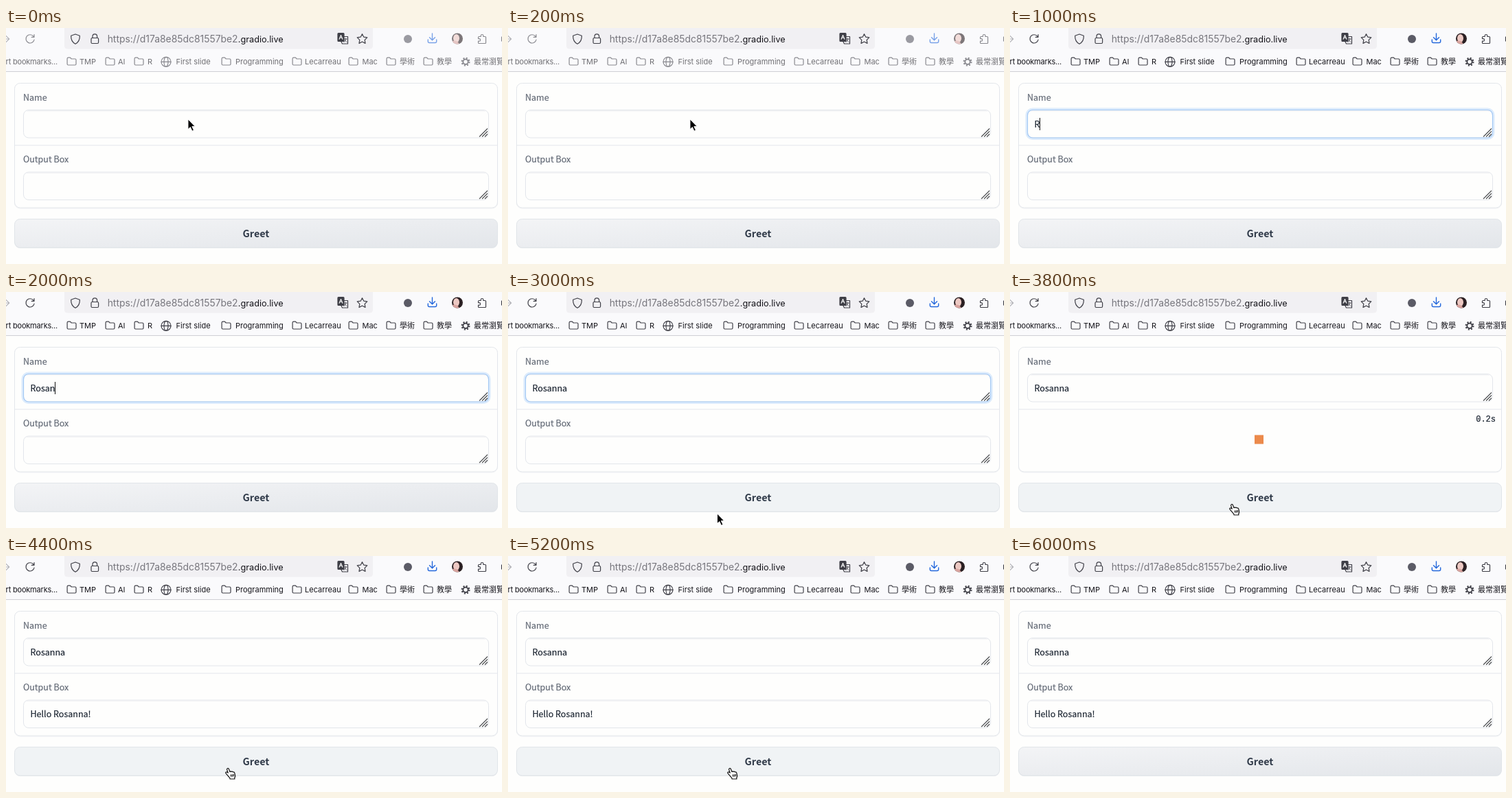
Write an HTML page that moves like this. It is 722 px wide and 344 px high and loops after 6.2 s.

```html
<!DOCTYPE html>
<html lang="en">
<head>
<meta charset="utf-8">
<title>Greeting form</title>
<style>
  html, body { margin: 0; width: 100%; height: 100%; overflow: hidden; background: #fefefd; }
  svg { display: block; width: 100%; height: 100%; }
  text { white-space: pre; }
  .ui { font: 11px Inter, "Noto Sans CJK TC", "Noto Sans CJK SC", "Noto Sans CJK JP", sans-serif; fill: #15141a; }
  .ui .path { font-size: 13.9px; fill: #77767d; }
  .ui .host { font-size: 12.7px; }
  .page { font: 12.5px "Noto Sans CJK TC", "Noto Sans CJK SC", "Noto Sans CJK JP", "Noto Sans CJK", "Open Sans", sans-serif; }
  .page text { fill: #1b2431; stroke: #1b2431; stroke-width: .2; }
  .page .label { fill: #626975; stroke: #626975; }
  .page .go { font-size: 14.3px; font-weight: 600; fill: #313b4a; stroke: none; }
  .page .mono { font: 12px "Liberation Mono", monospace; }
  .icon { fill: none; stroke: #3f3f47; stroke-width: 1.2; stroke-linecap: round; stroke-linejoin: round; }
  .idle .fade { opacity: .6; }
</style>
</head>
<body>
<svg viewBox="0 0 722 344" xmlns="http://www.w3.org/2000/svg">
  <defs>
    <linearGradient id="rest" x1="0" y1="0" x2="1" y2="1">
      <stop offset="0" stop-color="#f3f4f6"/><stop offset="1" stop-color="#e3e6ea"/>
    </linearGradient>
    <clipPath id="face"><circle cx="657" cy="15.5" r="8"/></clipPath>
    <path id="folder" d="M.6 2.3Q.6.7 2.2.7H5L6.7 2.5H12Q13.5 2.5 13.5 4V10Q13.5 11.5 12 11.5H2.2Q.6 11.5.6 10Z"/>
    <path id="grip" d="M0 12L12 0M4 12L12 4M8 12L12 8" stroke="#4b4d50" stroke-width="1.1"/>
    <g id="field">
      <rect x="25.5" y=".5" width="677" height="40.5" rx="7.5" fill="#fefefd" stroke="#e3e6eb"/>
      <path d="M30 1.8H698" stroke="#f1f2f4" stroke-width="1.6"/>
    </g>
  </defs>

  <g id="chrome" class="idle">
    <rect width="722" height="63.5" fill="#fafafc"/>
    <path d="M0 63.5H722" stroke="#cfcfd4"/>
    <path d="M85 0H534V26Q534 30.5 529 30.5H90Q85 30.5 85 26Z" fill="#f1f0f3"/>

    <g class="icon">
      <path d="M-3 16H4.5M0 11.5L4.7 16L0 20.5" stroke="#b5b5ba"/>
      <g class="fade">
        <path d="M40 12.2A6.1 6.1 0 1 0 41.1 17M41 9.5V13.3H37.2"/>
        <path d="M688.5 12.5H691.2V11.3A1.8 1.8 0 0 1 694.8 11.3V12.5H697.5Q698.5 12.5 698.5 13.5V21.5Q698.5 22.5 697.5 22.5H688.5Q687.5 22.5 687.5 21.5V19.2H688.8A1.8 1.8 0 0 0 688.8 15.6H687.5V13.5Q687.5 12.5 688.5 12.5Z"/>
        <path d="M721.5 13V19"/>
      </g>
      <path d="M101 9L107.3 11.2Q107.8 19.5 101 23.2Q94.2 19.5 94.7 11.2Z"/>
      <rect x="124" y="14.5" width="10.6" height="8" rx="1.5"/>
      <path d="M126 14.5V12.2A3.3 3.3 0 0 1 132.6 12.2V14.5"/>
      <path d="M518.5 8.7L520.8 13.2L525.8 13.9L522.2 17.4L523 22.4L518.5 20L514 22.4L514.8 17.4L511.2 13.9L516.2 13.2Z"/>
      <path d="M491 12.5H497.5V23H489.5L488 20"/>
      <path d="M492 16H496.2M494.1 15V16M495.3 16Q494.5 19 491.8 20.5M493 17.5L496 20.5" stroke-width=".8"/>
      <rect x="483" y="7.5" width="9" height="12" rx="1" fill="#3f3f47"/>
      <path d="M485.1 16.3L487.5 10.5L489.9 16.3M486 14.3H489" stroke="#fff" stroke-width="1.1"/>
    </g>

    <g class="fade">
      <circle cx="585" cy="16" r="6" fill="#5b5b66"/>
      <path class="icon" style="stroke:#2468dc;stroke-width:1.4" d="M620.5 8V17.5M616.5 13.8L620.5 17.7L624.5 13.8M614.3 17V19.5Q614.3 21.5 616.3 21.5H624.7Q626.7 21.5 626.7 19.5V17"/>
      <g clip-path="url(#face)">
        <rect x="649" y="7" width="16" height="17" fill="#2b2023"/>
        <ellipse cx="655.5" cy="15" rx="4.5" ry="6" fill="#edc9c3"/>
        <path d="M649 24V19Q657 17 660 24Z" fill="#d9a49f"/>
      </g>
    </g>

    <g class="ui">
      <text class="path" x="337.6" y="20.5" text-anchor="end">https://d17a8e85dc81557be2</text>
      <text class="host" x="337.8" y="20.5">.gradio.live</text>
    </g>
    <g id="marks" class="ui fade">
      <text x="75" y="53.4" text-anchor="end" letter-spacing="-.2">Import bookmarks...</text>
      <g class="icon" transform="translate(233 49.3)">
        <circle r="7"/><ellipse rx="3" ry="7"/><path d="M-7 0H7"/>
      </g>
      <g class="icon" transform="translate(669 49.3)">
        <circle r="3.7" stroke-width="1.9"/>
        <circle r="5.4" stroke-width="2.2" stroke-linecap="butt" stroke-dasharray="2 2.241"/>
      </g>
    </g>
  </g>

  <g class="page">
    <rect x="12.5" y="81.5" width="703" height="181.5" rx="8" fill="none" stroke="#f0f1f3"/>
    <rect x="12.5" y="80.5" width="703" height="181.5" rx="8" fill="#fefefd" stroke="#e3e6eb"/>
    <path d="M13 171H715" stroke="#e3e6eb"/>
    <text class="label" x="25" y="105.8">Name</text>
    <use href="#field" y="119"/>
    <g id="ring" fill="none">
      <rect x="24" y="118" width="680" height="43.5" rx="9" stroke="#dcebfc" stroke-width="3"/>
      <rect x="25.5" y="119.5" width="677" height="40.5" rx="7.5" stroke="#a3c8f4" stroke-width="1.2"/>
    </g>
    <use href="#grip" x="689" y="146.5"/>
    <text id="name" x="35.5" y="144.6"></text>
    <path id="caret" d="M0 131V149" stroke="#111"/>

    <g id="output">
      <text class="label" x="25" y="196.3">Output Box</text>
      <use href="#field" y="209.5"/>
      <use href="#grip" x="689" y="237"/>
      <text id="reply" x="35.5" y="235"></text>
    </g>
    <g id="pending">
      <text id="timer" class="mono" x="707" y="188.5" text-anchor="end"></text>
      <rect x="356" y="208.5" width="13" height="13" fill="#ec8a4b"/>
    </g>

    <rect x="12.5" y="280" width="703" height="41" rx="8" fill="#e6e9ec"/>
    <rect id="button" x="12.5" y="278.5" width="703" height="41.5" rx="8" stroke="#e1e5e9"/>
    <text class="go" x="364" y="305.2" text-anchor="middle">Greet</text>
  </g>

  <g id="pointer">
    <path id="arrow" d="M0 0V14.6L3.4 11.5L6 17.2L8.4 16.1L5.8 10.6H10.2Z" fill="#000" stroke="#fff" stroke-width=".9"/>
    <path id="beam" d="M-2.5 -8Q0 -8 0 -6Q0 -8 2.5 -8M0 -6V6M-2.5 8Q0 8 0 6Q0 8 2.5 8M-1.5 3H1.5" fill="none" stroke="#222"/>
    <path id="hand" d="M3.6 11.2L1 8.2Q-.2 6.6 1 6Q2.2 5.4 3.9 7L2.4 2.6Q2 .9 3.3.5Q4.6.2 5.2 1.8L6.6 5.6Q7.6 4.3 8.9 5.5Q10.2 4.6 11.2 5.9Q13 5.4 13.5 7.4L14.2 10.5Q14.6 12.8 13.4 14.6L13.6 16H6.8L6.5 14.6Q5 13 3.6 11.2ZM8 9.5L8.4 12.8M10 9.3L10.4 12.6M12 9L12.3 12.3" fill="#fff" stroke="#111" stroke-width="1.2" stroke-linejoin="round"/>
  </g>
</svg>
<script>
const LOOP = 6200, STEP = 200;
const NAME = "Rosanna";
const $ = id => document.getElementById(id);
const show = (id, on) => { $(id).style.display = on ? "" : "none"; };
const within = (t, a, b) => t >= a && t < b;

// Each row holds from its time until the next row.
const typed = [[0, 0], [1000, 1], [1200, 2], [1400, 4], [2000, 5], [2200, 6], [2400, 7]];
const moves = [
  [0, "arrow", 265, 133], [400, "beam", 266, 140], [1000, ""],
  [2600, "beam", 268, 146], [2800, "beam", 288, 238],
  [3000, "arrow", 304.5, 323], [3200, "arrow", 314, 322],
  [3400, "hand", 319.3, 309], [5600, ""]
];
const rowAt = (rows, t) => rows.filter(r => r[0] <= t).pop();

const bookmarks = [
  [89, 107, "TMP"], [145, 163, "AI"], [187, 206, "R"], [0, 247.5, "First slide"],
  [314, 334, "Programming"], [417, 435, "Lecarreau"], [499, 518.5, "Mac"],
  [554, 573, "學術"], [608, 627, "教學"], [0, 681, "最常瀏覽"]
];

function add(tag, attrs, text) {
  const el = document.createElementNS("http://www.w3.org/2000/svg", tag);
  for (const key in attrs) el.setAttribute(key, attrs[key]);
  if (text) el.textContent = text;
  $("marks").append(el);
}
for (const [icon, x, label] of bookmarks) {
  if (icon) add("use", { href: "#folder", class: "icon", x: icon - 0.5, y: 42.5 });
  add("text", { x, y: 53.4 }, label);
}

function draw(t) {
  $("chrome").classList.toggle("idle", t < 400);

  const name = $("name");
  const count = rowAt(typed, t)[1];
  name.textContent = NAME.slice(0, count);
  show("ring", within(t, 400, 3600));
  show("caret", within(t, 400, 2600));
  const end = count ? name.getComputedTextLength() : 0;
  $("caret").setAttribute("transform", `translate(${Math.round(36 + end) - 0.5} 0)`);

  const busy = within(t, 3600, 4400);
  show("pending", busy);
  show("output", !busy);
  $("timer").textContent = ((t - 3600) / 1000).toFixed(1) + "s";
  $("reply").textContent = t >= 4400 ? `Hello ${NAME}!` : "";

  const hover = within(t, 3000, 5600);
  $("button").setAttribute("fill", hover ? "#f0f3f5" : "url(#rest)");

  const [, kind, x = 0, y = 0] = rowAt(moves, t);
  for (const id of ["arrow", "beam", "hand"]) show(id, id === kind);
  $("pointer").setAttribute("transform", `translate(${x} ${y})`);
}

const start = performance.now();
let last = -1;
function tick() {
  const t = Math.floor((performance.now() - start) % LOOP / STEP) * STEP;
  if (t !== last) draw(last = t);
  requestAnimationFrame(tick);
}
tick();
</script>
</body>
</html>
```
